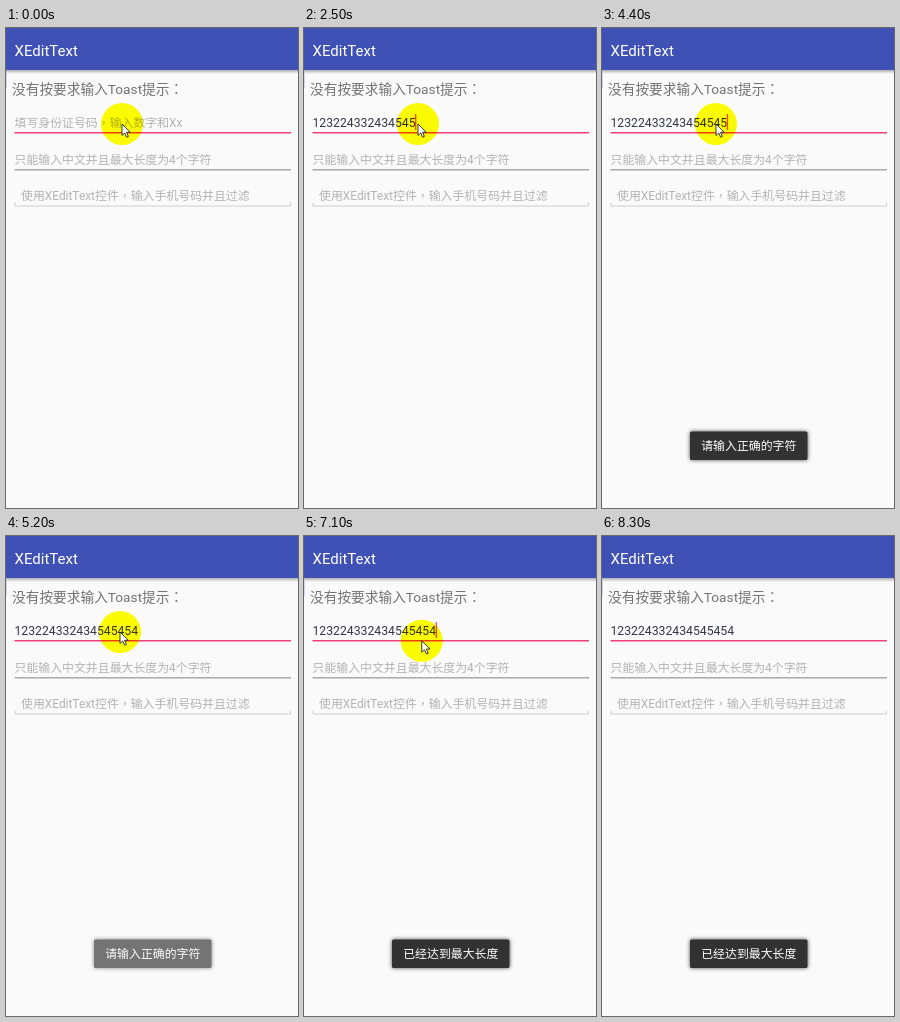
Write an HTML page that moves like this. It is 292 by 480 pixels and loops after 8.4 s.

```html
<!DOCTYPE html>
<html lang="zh-CN">
<head>
<meta charset="utf-8">
<style>
  html, body { margin: 0; width: 100%; height: 100%; overflow: hidden; background: #fafafa; }
  svg { display: block; width: 292px; height: 480px; }
  text { font: 11.9px Roboto, "Noto Sans CJK SC", sans-serif; white-space: pre; }
  .mark { font-family: "Noto Sans CJK TC", sans-serif; }
  .hint { fill: #b3b3b3; }
  #halo { fill: #ff0; mix-blend-mode: multiply; }
  #toast rect { filter: drop-shadow(0 .5px 2px rgba(0, 0, 0, .7)); }
</style>
</head>
<body>
<svg viewBox="0 0 292 480">
  <defs>
    <linearGradient id="shade" x2="0" y2="1">
      <stop stop-color="#000" stop-opacity=".3"/>
      <stop offset="1" stop-color="#000" stop-opacity="0"/>
    </linearGradient>
  </defs>
  <rect width="292" height="480" fill="#fafafa"/>
  <rect width="292" height="42" fill="#3f51b5"/>
  <rect y="42" width="292" height="4" fill="url(#shade)"/>
  <rect y="44" width="1" height="16" fill="#d5d5f2"/>
  <text x="8.5" y="28" fill="#fff" style="font-size:15px">XEditText</text>
  <text x="6" y="66" fill="#737373" style="font-size:13.7px">没有按要求输入Toast提示<tspan class="mark" lang="zh-TW">：</tspan></text>

  <text id="idHint" class="hint" x="8.5" y="99">填写身份证号码<tspan class="mark" lang="zh-TW">，</tspan>输入数字和Xx</text>
  <text id="digits" x="8.5" y="98.7" fill="#35354a" style="font-size:12.23px"></text>
  <rect x="8.5" y="104" width="276.5" height="1.5" fill="#f0407c"/>
  <rect id="caret" y="86" width="1.3" height="16" fill="#ff4081"/>

  <text class="hint" x="8.5" y="136.3">只能输入中文并且最大长度为4个字符</text>
  <rect x="8.5" y="141.3" width="276.5" height="1.1" fill="#8c8c8c"/>
  <text class="hint" x="15" y="172">使用XEditText控件<tspan class="mark" lang="zh-TW">，</tspan>输入手机号码并且过滤</text>
  <path d="M9 174.5V178H284.5V174.5" fill="none" stroke="#cfcfcf"/>

  <g id="toast">
    <rect x="88" y="403.5" width="117.5" height="28.5" rx="1.5" fill="#323232"/>
    <text id="message" x="146.8" y="422.3" fill="#fff" font-weight="500" text-anchor="middle"></text>
  </g>

  <circle id="halo" r="21"/>
  <path id="pointer" d="M0 0V11.5L2.7 9L4.6 13.2L6.4 12.4L4.6 8.3H8.2Z" fill="#fff" stroke="#222" stroke-width=".9"/>
</svg>
<script>
  const LOOP = 8400, STEP = 100, BLINK = 500;
  const ID = '123224332434545454';
  const keyTimes = [400, 600, 700, 900, 1000, 1100, 1200, 1400, 1500,
                    1600, 1800, 2100, 2200, 2300, 2400, 2600, 4100, 4700];
  const el = id => document.getElementById(id);
  const [idHint, digits, caret, toast, message, halo, pointer] =
    ['idHint', 'digits', 'caret', 'toast', 'message', 'halo', 'pointer'].map(el);
  const clamp = v => Math.min(1, Math.max(0, v));
  const easeOut = (t, start, length) => 1 - (1 - clamp((t - start) / length)) ** 2;

  function drawField(t) {
    const count = keyTimes.filter(k => k <= t).length;
    const sinceKey = t - keyTimes[count - 1];
    idHint.style.display = count ? 'none' : '';
    digits.textContent = ID.slice(0, count);
    caret.setAttribute('x', 8 + count * 6.87);
    caret.style.display = count && Math.floor(sinceKey / BLINK) % 2 === 0 ? '' : 'none';
  }

  function drawToast(t) {
    const second = t >= 5400;
    message.textContent = second ? '已经达到最大长度' : '请输入正确的字符';
    toast.style.opacity = second
      ? easeOut(t, 5300, 500)
      : easeOut(t, 3050, 650) * (1 - clamp((t - 5100) / 300));
  }

  function drawPointer(t) {
    const leave = Math.max(0, (t - 7000) / 800) ** 2;
    const x = (t < 700 ? 116 : 114) + 240 * leave;
    const y = 96 + 560 * leave;
    for (const part of [halo, pointer]) part.setAttribute('transform', `translate(${x} ${y})`);
  }

  const begin = performance.now();
  function draw() {
    const elapsed = (performance.now() - begin) % LOOP;
    const t = Math.floor(elapsed / STEP) * STEP;
    drawField(t);
    drawToast(t);
    drawPointer(t);
    requestAnimationFrame(draw);
  }
  draw();
</script>
</body>
</html>
```
